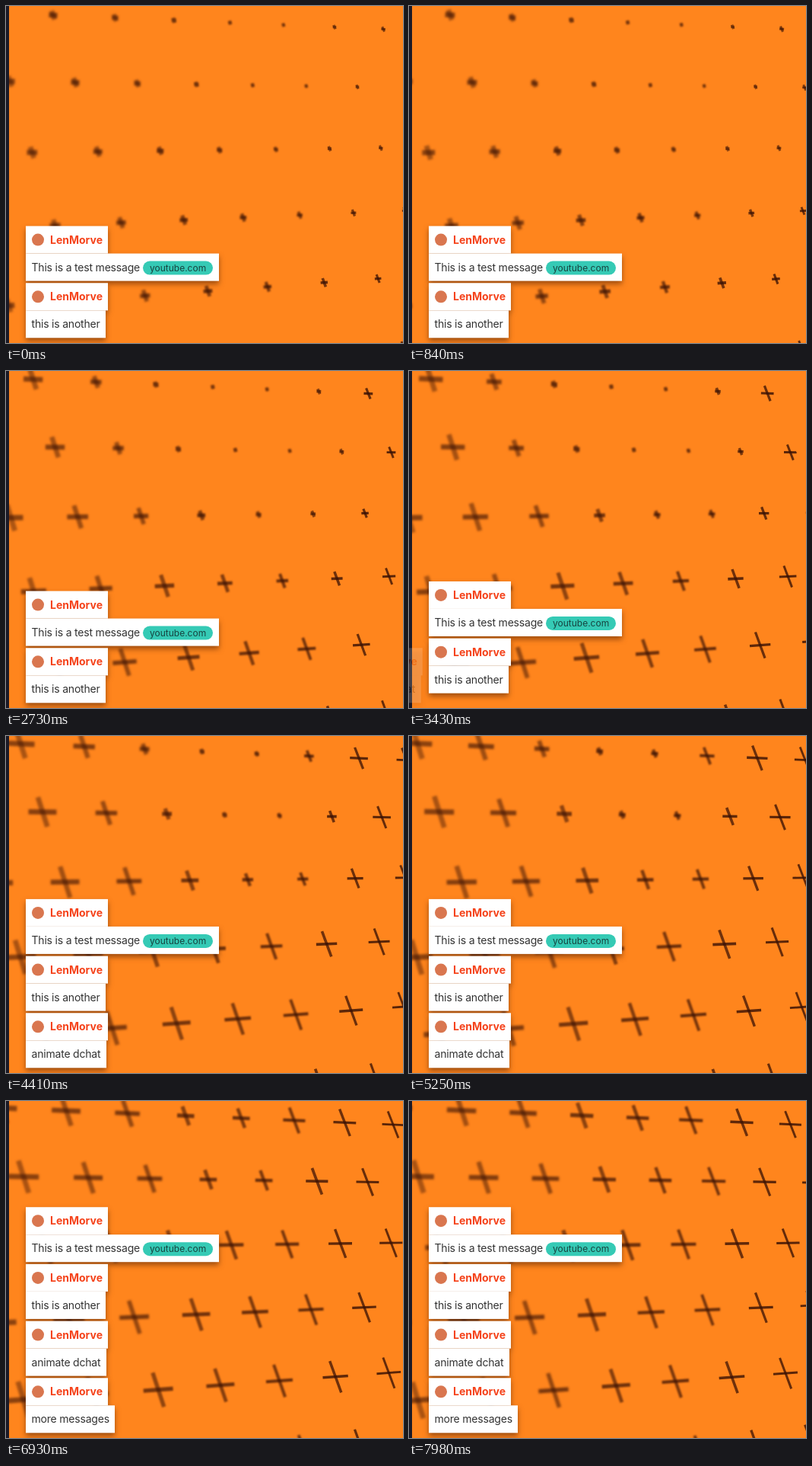
An HTML page that plays this animation: 522 by 442 pixels, repeating every 8 s.

```html
<!DOCTYPE html>
<html lang="en">
<head>
<meta charset="utf-8">
<title>Chat overlay</title>
<style>
html, body { margin: 0; width: 100%; height: 100%; overflow: hidden; background: #ff851d; }
#stage { position: absolute; left: 0; top: 0; width: 522px; height: 442px; overflow: hidden;
  font: 14px/36px Inter, "Open Sans", sans-serif; }
svg { position: absolute; left: 0; top: 0; }
.card { position: absolute; left: 26px; top: 0; white-space: nowrap;
  filter: drop-shadow(0 4px 3.5px rgba(60, 20, 0, .5)); }
.name, .body { background: #fff; width: max-content; height: 36px; opacity: var(--p); }
.name { position: relative; padding: 0 7px 0 32px; font-weight: 700; color: #f5431b; }
.name::before { content: ""; position: absolute; left: 8px; top: 9.5px; width: 16px; height: 16px;
  border-radius: 50%; background: #d9764f; }
.body { margin-top: -.5px; padding: 0 7.5px; color: #333; letter-spacing: -.2px; }
.pill { display: inline-block; height: 18px; margin-left: 4px; padding: 0 9px; border-radius: 9px;
  background: #35cab5; color: #17433f; font-size: 12px; line-height: 18px; letter-spacing: 0; }
</style>
</head>
<body>
<div id="stage">
  <svg width="522" height="442" viewBox="0 0 522 442">
    <rect width="522" height="442" fill="#ff851d"/>
    <g id="field" fill="none" stroke="#3a1205"></g>
    <rect width="4" height="442" fill="#1b1a27"/>
  </svg>
</div>
<script>
const LOOP = 8000, STEP = 70, DRIFT = 0.1145, PITCH = 74.7, FULL = 19.5;
const stage = document.getElementById('stage');
const field = document.getElementById('field');
const clamp = x => Math.min(1, Math.max(0, x));
const mix = (a, b, k) => a + (b - a) * k;

function svg(tag, parent) {
  return parent.appendChild(document.createElementNS('http://www.w3.org/2000/svg', tag));
}

// Crosses open from the edges inwards; those near (3.4, 0.5) come last
const crosses = [];
for (let row = 0; row < 6; row++) {
  for (let col = -2; col < 9; col++) {
    const g = svg('g', field);
    const open = 2 + 5 * Math.exp(-((col - 3.4) ** 2) / 6 - (row - 0.5) ** 2 / 5);
    const rest = 6.5 - 0.5 * open - 0.2 * col;
    crosses.push({ g, flat: svg('path', g), tall: svg('path', g), row, col, open, rest });
  }
}

// Tilted plane to screen
function project(u, v) {
  const w = 1 + 0.0256 * u - 0.0132 * v;
  return [(85.05 * u + 27.8 * v + 62) / w, (3.85 * u + 86.97 * v + 12) / w];
}

const line = (...ends) => 'M' + ends.map(e => project(...e).map(n => n.toFixed(2)).join(' ')).join('L');

function drawCross({ g, flat, tall, row: v, col, open, rest }, sec) {
  const u = col - DRIFT * sec;
  const k = clamp(project(u, v)[0] / 522);
  const arm = mix(rest, FULL, 1 / (1 + Math.exp((open - sec) / 0.8)));
  const s = arm * 0.0119;
  const ink = clamp(0.3 + arm / 8);
  flat.setAttribute('d', line([u - s, v], [u + s, v]));
  tall.setAttribute('d', line([u, v - s], [u, v + s]));
  flat.setAttribute('opacity', ink * mix(0.58, 0.85, k));
  tall.setAttribute('opacity', ink * mix(0.42, 0.8, k));
  g.setAttribute('stroke-width', Math.min(mix(7, 2.8, k), 2 * arm));
  g.style.filter = `blur(${mix(1.8, 0.5, k).toFixed(2)}px)`;
}

const messages = [
  { html: 'This is a test message<span class="pill">youtube.com</span>', at: -2000 },
  { html: 'this is another', at: -1000 },
  { html: 'animate dchat', at: 3400 },
  { html: 'more messages', at: 5600 }
];
for (const m of messages) {
  m.el = document.createElement('div');
  m.el.className = 'card';
  m.el.innerHTML = `<div class="name">LenMorve</div><div class="body">${m.html}</div>`;
  stage.append(m.el);
}

const enter = (m, t) => 1 - (1 - clamp((t - m.at) / 500)) ** 3;

function render(t) {
  crosses.forEach(c => drawCross(c, t / 1000));
  messages.forEach((m, i) => {
    const p = enter(m, t);
    const above = messages.slice(i + 1).reduce((sum, n) => sum + enter(n, t), 0);
    m.el.style.transform = `translate(${-140 * (1 - p)}px, ${363.3 - PITCH * above}px)`;
    m.el.style.setProperty('--p', p);
    m.el.style.visibility = t < m.at ? 'hidden' : 'visible';
  });
}

const start = performance.now();
function tick() {
  const t = (performance.now() - start) % LOOP;
  render(Math.floor(t / STEP) * STEP);
  requestAnimationFrame(tick);
}
tick();
</script>
</body>
</html>
```
